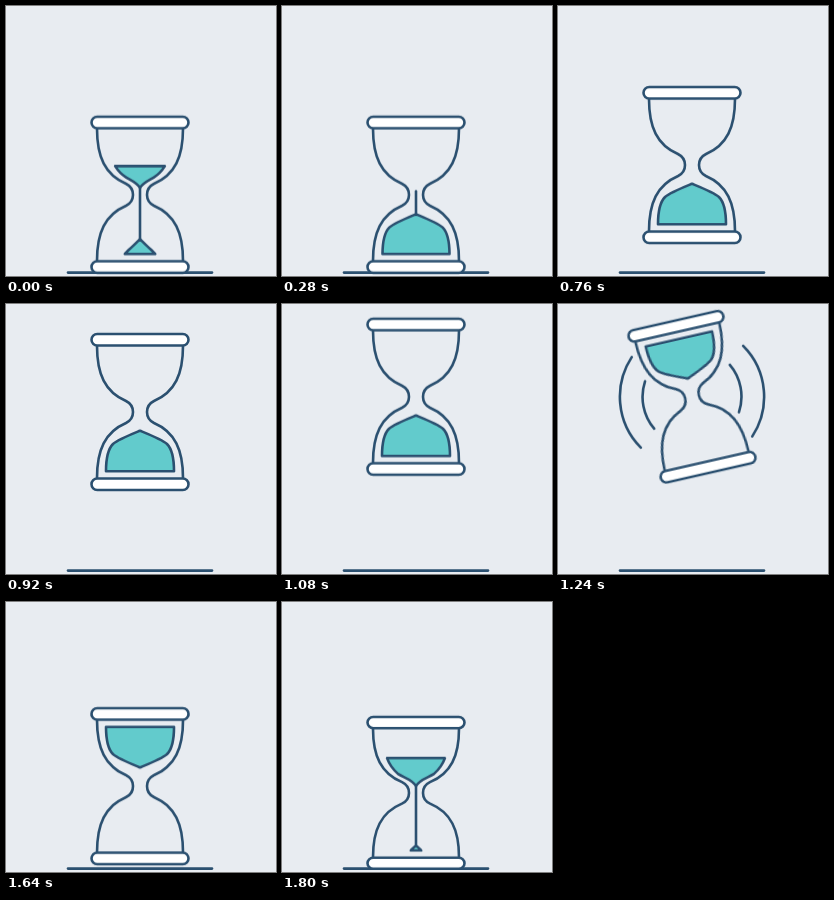
These frames come from a looping animation (270x270 px, 1.84 s). An HTML page without scripts:

```html
<!DOCTYPE html>
<html lang="en">
<head>
<meta charset="utf-8">
<title>Hourglass</title>
<style>
  html, body { margin: 0; width: 100%; height: 100%; overflow: hidden; background: #e8ecf1; }
  svg { display: block; width: 100vw; height: 100vh; }
  .ink { fill: none; stroke: #2b5070; stroke-width: 2.6; stroke-linecap: round; stroke-linejoin: round; }
  .cap { fill: #fff; }
  .sand { fill: #62cbcc; }
  .hop, .squash, .spin, .sand, .stream, .arc { animation: 1840ms linear infinite; }

  .hop { animation-name: hop; }
  @keyframes hop {
    0% { transform: translateY(0); }
    36.96% { transform: translateY(0); animation-timing-function: cubic-bezier(.39, .575, .565, 1); }
    58.7% { transform: translateY(-96px); }
    69.35% { transform: translateY(-96px); animation-timing-function: cubic-bezier(.47, 0, .745, .715); }
    90%, 100% { transform: translateY(0); }
  }

  .squash { animation-name: squash; transform-origin: 0 78px; }
  @keyframes squash {
    0%, 30.43% { transform: scaleY(1); }
    34.78% { transform: scaleY(.934); }
    36.96%, 90% { transform: scaleY(1); }
    94.35% { transform: scaleY(.93); }
    100% { transform: scaleY(1); }
  }

  /* the glass is symmetric, so the half turn can reset unseen */
  .spin { animation-name: spin; }
  @keyframes spin {
    0% { transform: rotate(0deg); }
    58.7% { transform: rotate(0deg); animation-timing-function: cubic-bezier(.45, 0, .55, 1); }
    69.57%, 90.7% { transform: rotate(180deg); }
    90.71%, 100% { transform: rotate(0deg); }
  }

  .pile { animation-name: pile; }
  @keyframes pile {
    0% {
      d: path("M-15 59.2C-13 57.2 -12 56.2 -11 55.2C-7 51.5 -3 47.5 0 44.5C3 47.5 7 51.5 11 55.2C12 56.2 13 57.2 15 59.2Z");
      opacity: 1;
      animation-timing-function: cubic-bezier(.2, .55, .45, 1);
    }
    19.5%, 90.7% {
      d: path("M-34 59.2C-34 46 -31 36 -27 32C-22 27.5 -8 22 0 18.7C8 22 22 27.5 27 32C31 36 34 46 34 59.2Z");
      opacity: 1;
    }
    90.71%, 96.4% {
      d: path("M-2 59.2C-2 59 -1 58.5 -1 58.5C-1 58 0 58 0 58C0 58 1 58 1 58.5C1 58.5 2 59 2 59.2Z");
      opacity: 0;
    }
    96.41% {
      d: path("M-2 59.2C-2 59 -1 58.5 -1 58.5C-1 58 0 58 0 58C0 58 1 58 1 58.5C1 58.5 2 59 2 59.2Z");
      opacity: 1;
    }
    97.83% {
      d: path("M-5 59.2C-4 58.2 -4 58 -3.5 57.5C-2 56 -1 55 0 54.7C1 55 2 56 3.5 57.5C4 58 4 58.2 5 59.2Z");
      opacity: 1;
    }
    100% {
      d: path("M-15 59.2C-13 57.2 -12 56.2 -11 55.2C-7 51.5 -3 47.5 0 44.5C3 47.5 7 51.5 11 55.2C12 56.2 13 57.2 15 59.2Z");
      opacity: 1;
    }
  }

  .drain { animation-name: drain; }
  @keyframes drain {
    0% {
      d: path("M-25 -28.8C-22 -24 -18 -20 -14 -17.5C-9 -14.5 -3 -12 0 -7C3 -12 9 -14.5 14 -17.5C18 -20 22 -24 25 -28.8Z");
      opacity: 1;
      animation-timing-function: cubic-bezier(.3, .5, .6, 1);
    }
    15.2% {
      d: path("M-1 -7C-1 -6 -1 -6 -1 -5C0 -5 0 -4 0 -3C0 -4 0 -5 1 -5C1 -6 1 -6 1 -7Z");
      opacity: 1;
    }
    15.21%, 90.7% {
      d: path("M-34 -59.2C-34 -46 -31 -36 -27 -32C-22 -27.5 -8 -22 0 -18.7C8 -22 22 -27.5 27 -32C31 -36 34 -46 34 -59.2Z");
      opacity: 0;
    }
    90.71% {
      d: path("M-34 -59.2C-34 -46 -31 -36 -27 -32C-22 -27.5 -8 -22 0 -18.7C8 -22 22 -27.5 27 -32C31 -36 34 -46 34 -59.2Z");
      opacity: 1;
    }
    97.83% {
      d: path("M-29 -35.8C-27 -30 -24 -25 -18 -19.5C-12 -15.5 -4 -14 0 -7C4 -14 12 -15.5 18 -19.5C24 -25 27 -30 29 -35.8Z");
      opacity: 1;
    }
    100% {
      d: path("M-25 -28.8C-22 -24 -18 -20 -14 -17.5C-9 -14.5 -3 -12 0 -7C3 -12 9 -14.5 14 -17.5C18 -20 22 -24 25 -28.8Z");
      opacity: 1;
    }
  }

  .stream { animation-name: stream; }
  @keyframes stream {
    0% { d: path("M0 -7V44.5"); opacity: 1; animation-timing-function: cubic-bezier(.2, .55, .45, 1); }
    15.2% { d: path("M0 -4V20"); opacity: 1; }
    18.5% { d: path("M0 19V20"); opacity: 1; }
    18.51%, 90.7% { d: path("M0 -19V-18"); opacity: 0; }
    90.71% { d: path("M0 -19V-18"); opacity: 1; }
    96.4% { d: path("M0 -9V58"); opacity: 1; }
    97.83% { d: path("M0 -7V55"); opacity: 1; }
    100% { d: path("M0 -7V44.5"); opacity: 1; }
  }

  .arc { animation-name: arc; }
  @keyframes arc {
    0%, 61% { stroke-dasharray: 0 200; stroke-dashoffset: 0; opacity: 0; }
    61.01% { stroke-dasharray: 0 200; stroke-dashoffset: 0; opacity: 1; }
    67.39% { stroke-dasharray: 52.6 200; stroke-dashoffset: -22.7; opacity: 1; }
    73% { stroke-dasharray: 0 200; stroke-dashoffset: -100; opacity: 1; }
    73.01%, 100% { stroke-dasharray: 0 200; stroke-dashoffset: -100; opacity: 0; }
  }
</style>
</head>
<body>
<svg viewBox="0 0 270 270">
  <g class="ink">
    <path d="M62 266.6H206"/>
    <g transform="translate(134 92.75)">
      <path class="arc" pathLength="100" d="M-12.5 71.1A72.2 72.2 0 0 1 -24.7 -67.8"/>
      <path class="arc" pathLength="100" d="M-19.8 45.3A49.4 49.4 0 0 1 -34.6 -35.3"/>
      <path class="arc" pathLength="100" transform="rotate(180)" d="M-12.5 71.1A72.2 72.2 0 0 1 -24.7 -67.8"/>
      <path class="arc" pathLength="100" transform="rotate(180)" d="M-19.8 45.3A49.4 49.4 0 0 1 -34.6 -35.3"/>
    </g>
    <g transform="translate(134 188.75)">
      <g class="hop">
        <g class="squash">
          <g class="spin">
            <path d="M-43 -66C-43 -38 -35 -20 -14 -11C-10 -9 -7 -5 -7 0C-7 5 -10 9 -14 11C-35 20 -43 38 -43 66"/>
            <path d="M43 -66C43 -38 35 -20 14 -11C10 -9 7 -5 7 0C7 5 10 9 14 11C35 20 43 38 43 66"/>
            <rect class="cap" x="-48.5" y="-78" width="97" height="11.5" rx="5.75"/>
            <rect class="cap" x="-48.5" y="66.5" width="97" height="11.5" rx="5.75"/>
            <path class="sand pile" d="M-15 59.2L0 44.5L15 59.2Z"/>
          </g>
          <path class="sand drain" d="M-25 -28.8L0 -7L25 -28.8Z"/>
          <path class="stream" d="M0 -7V44.5"/>
        </g>
      </g>
    </g>
  </g>
</svg>
</body>
</html>
```
